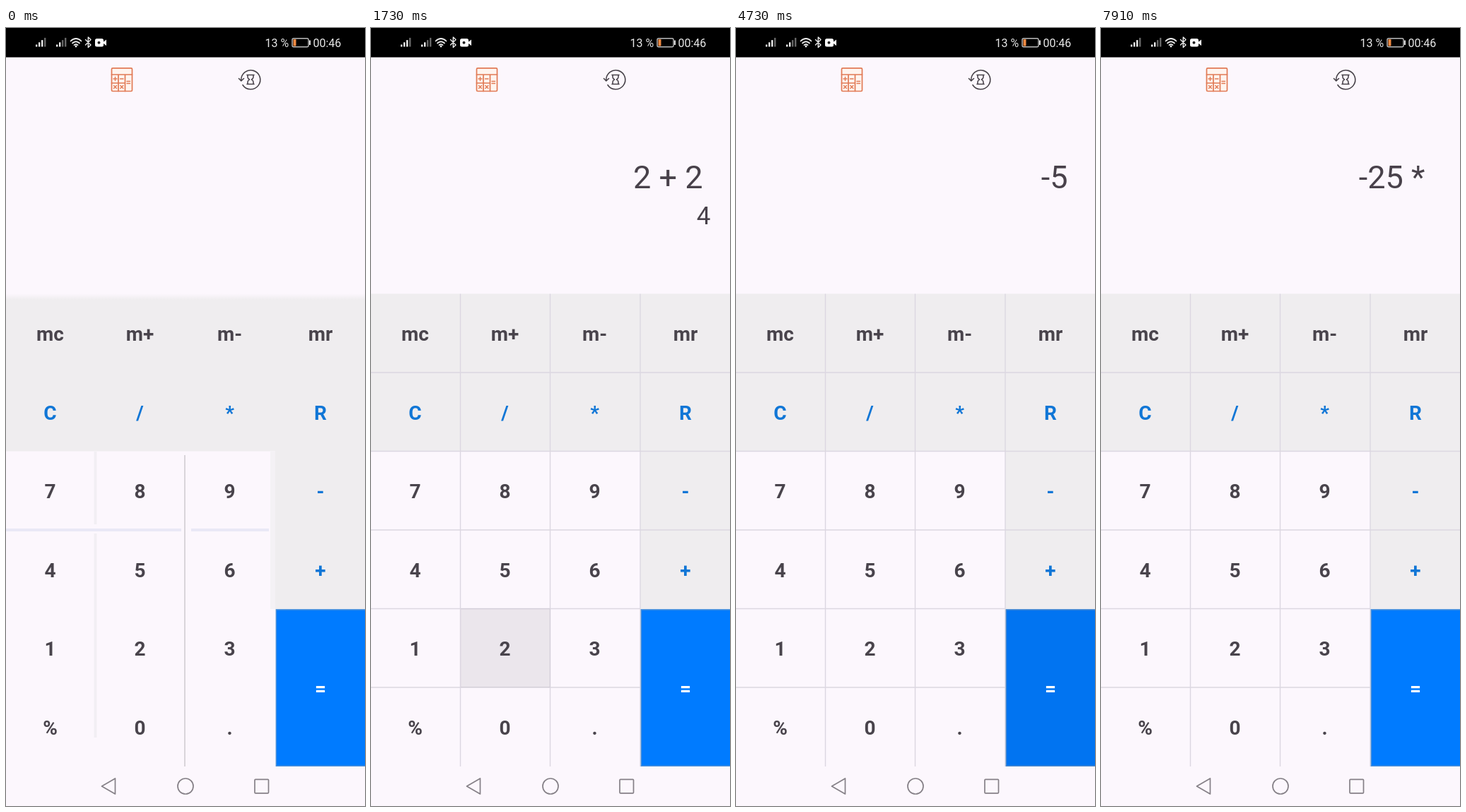
Animation, 508 px wide and 1102 px high, one loop 8000 ms. Source, as an HTML page:

```html
<!DOCTYPE html>
<html lang="en">
<head>
<meta charset="utf-8">
<title>Calculator</title>
<style>
  html, body { margin: 0; width: 100%; height: 100%; overflow: hidden; background: #fcf7fd; }
  svg { display: block; width: 100vw; height: 100vh; font-family: Roboto, sans-serif; }
  .key { font-size: 28px; font-weight: 700; text-anchor: middle; }
  .out { text-anchor: end; fill: #48414a; }
  .status { font-size: 16px; fill: #e8e8e8; }
  .line { fill: none; stroke-linecap: round; stroke-linejoin: round; }
</style>
</head>
<body>
<svg viewBox="0 0 508 1102" preserveAspectRatio="none">
  <defs>
    <clipPath id="keyClip"><rect id="clipBox"/></clipPath>
    <linearGradient id="softTop" x2="0" y2="1">
      <stop stop-color="#fcf7fd"/><stop offset="1" stop-color="#efedef"/>
    </linearGradient>
  </defs>
  <rect width="508" height="1102" fill="#fcf7fd"/>
  <rect width="508" height="41.5"/>

  <!-- status bar -->
  <g id="signals"></g>
  <g class="line" stroke="#eee" stroke-width="1.7">
    <path d="M91.5 18.5Q99 11.5 106.5 18.5M94 21.5Q99 17 104 21.5M96.5 24.2Q99 22 101.5 24.2"/>
    <path d="M112.5 16.5L120 24L116.3 27.5V13L120 16.5L112.5 24" stroke-width="1.4"/>
  </g>
  <circle cx="99" cy="26" r="1.4" fill="#eee"/>
  <rect x="126" y="15" width="12" height="11.5" rx="2.5" fill="#fff"/>
  <path d="M138 19.5L142 16.5V25L138 22Z" fill="#fff"/>
  <circle cx="131.5" cy="20.7" r="2" fill="#222"/>
  <text class="status" x="366.5" y="26.5">13 %</text>
  <rect x="405" y="14.7" width="23" height="12" rx="2" fill="none" stroke="#bbb" stroke-width="1.4"/>
  <rect x="406.5" y="16" width="4" height="9.5" fill="#f28a42"/>
  <rect x="429" y="17.5" width="2" height="6.5" fill="#ddd"/>
  <text class="status" x="434.5" y="26.5">00:46</text>

  <!-- header icons -->
  <g class="line" stroke="#e17a55" stroke-width="1.7">
    <rect x="149.5" y="56.8" width="29" height="32.7" rx="1.5" fill="#fff4ee"/>
    <path d="M149.5 66H178.5M168.5 66V89.5M159 66V89.5M149.5 78H168.5"/>
    <path d="M152 72H157M154.5 69.5V74.5M161.5 72H166M152.5 81.5L156.5 85.5M156.5 81.5L152.5 85.5M161.8 81.5L165.8 85.5M165.8 81.5L161.8 85.5M171 75.5H175.5M171 78.5H175.5" stroke-width="1.4"/>
  </g>
  <g class="line" stroke="#48434a" stroke-width="1.6">
    <path d="M332.8 74A13.5 13.5 0 1 1 335 80.7M329.5 71.5L332.8 75L336.5 71.5"/>
    <path d="M341 66.5H351M341 79.5H351M342 66.5V69.5Q342 71.5 344.5 73Q342 74.5 342 76.5V79.5M350 66.5V69.5Q350 71.5 347.5 73Q350 74.5 350 76.5V79.5"/>
  </g>

  <text id="expression" class="out" x="469.5" y="227.3" font-size="45"/>
  <text id="result" class="out" x="480.5" y="278" font-size="35"/>

  <!-- keypad -->
  <path d="M0 376.5H508V823.5H381V599.5H0Z" fill="#efedef"/>
  <path id="gridLines" fill="none" stroke="#dcd7e1" stroke-width="1.4"/>
  <g id="softLines">
    <rect y="376" width="508" height="9" fill="url(#softTop)"/>
    <path d="M0 711H248M262 711H372" stroke="#e9e8f6" stroke-width="4"/>
    <path d="M126.5 600V703M126.5 716V1005" stroke="#f2eff4" stroke-width="4"/>
    <path d="M253 605V1046" stroke="#c2bec4" stroke-width="1.2"/>
    <path d="M377.5 600V823" stroke="#f4f1f5" stroke-width="7"/>
  </g>
  <rect x="382" y="823.5" width="126" height="222" fill="#007bff"/>
  <path d="M508 824H382.3V1045.3H508" fill="none" stroke="#4a90d9" stroke-width="1.4"/>
  <circle id="ripple" clip-path="url(#keyClip)" fill="#140a18"/>
  <g id="labels"></g>

  <!-- navigation -->
  <g class="line" stroke="#858087" stroke-width="1.7">
    <path d="M135.5 1074L154.5 1063V1085Z"/>
    <circle cx="254" cy="1074" r="11"/>
    <rect x="352" y="1064.3" width="19.5" height="19.5" rx="1"/>
  </g>
</svg>
<script>
const LOOP = 8000;
const ROW_TOP = 376.5, ROW_HEIGHT = 111.5;
const COLUMN_EDGES = [0, 126.5, 253.5, 381, 508];
const LABEL_X = [62.5, 189.5, 316.5, 445];
const ROWS = [
  ["mc", "m+", "m-", "mr"],
  ["C", "/", "*", "R"],
  ["7", "8", "9", "-"],
  ["4", "5", "6", "+"],
  ["1", "2", "3", "="],
  ["%", "0", "."]
];
// press time, key, expression and result shown afterwards
const PRESSES = [
  [330, "2", "2", ""],
  [690, "+", "2 + ", ""],
  [1280, "2", "2 + 2", "4"],
  [2150, "=", "4", ""],
  [2710, "-", "4 - ", ""],
  [3350, "9", "4 - 9", "-5"],
  [4250, "=", "-5", ""],
  [4750, "*", "-5 * ", ""],
  [5240, "5", "-5 * 5", "-25"],
  [6750, "=", "-25", ""],
  [7280, "*", "-25 * ", ""]
];
const byId = id => document.getElementById(id);
const clamp = v => Math.max(0, Math.min(1, v));
const setAttrs = (node, attrs) => {
  for (const name in attrs) node.setAttribute(name, attrs[name]);
  return node;
};
function add(parent, tag, attrs) {
  const node = document.createElementNS("http://www.w3.org/2000/svg", tag);
  return parent.appendChild(setAttrs(node, attrs));
}

for (const [left, full] of [[42, 3], [71, 2]]) {
  for (let i = 0; i < 4; i++) {
    const height = 3 + i * 3.2;
    add(byId("signals"), "rect", {
      x: left + i * 4, y: 26.5 - height, width: 2.4, height,
      fill: i < full ? "#eee" : "#666"
    });
  }
}

const keys = {};
ROWS.forEach((row, r) => row.forEach((label, c) => {
  const tall = label === "=";
  const top = ROW_TOP + r * ROW_HEIGHT + (c === 3 ? 0.7 : 0);
  const height = ROW_HEIGHT * (tall ? 2 : 1);
  const x = COLUMN_EDGES[c] + 0.5;
  keys[label] = { x, y: top, width: COLUMN_EDGES[c + 1] - x, height };
  const fill = tall ? "#fff" : r === 1 || (c === 3 && r) ? "#1076d6" : "#49444c";
  add(byId("labels"), "text", {
    class: "key", x: LABEL_X[c], y: ROW_TOP + r * ROW_HEIGHT + height / 2 + 11, fill
  }).textContent = label;
}));

let grid = COLUMN_EDGES.slice(1, 4).map(x => `M${x} ${ROW_TOP}V1046`).join("");
for (let r = 1; r < 6; r++) {
  grid += `M0 ${ROW_TOP + r * ROW_HEIGHT}H${r < 4 ? 508 : 381}`;
}
byId("gridLines").setAttribute("d", grid);

function drawRipple(t) {
  const press = PRESSES.filter(([start]) => start <= t).pop();
  const age = press ? t - press[0] : LOOP;
  const opacity = 0.145 * (1 - clamp((age - 290) / 320));
  const ripple = byId("ripple");
  ripple.setAttribute("opacity", opacity);
  if (!opacity) return;
  const box = keys[press[1]];
  const spread = 1 - (1 - clamp(age / 265)) ** 2;
  setAttrs(byId("clipBox"), box);
  setAttrs(ripple, {
    cx: box.x + box.width / 2, cy: box.y + box.height / 2,
    r: Math.hypot(box.width, box.height) / 2 * spread
  });
}

function draw(t) {
  const shown = PRESSES.filter(([start]) => start + 130 <= t).pop();
  byId("expression").textContent = shown ? shown[2].replace(/ /g, "\u00a0") : "";
  byId("result").textContent = shown ? shown[3] : "";
  const sharp = clamp((t - 90) / 400);
  byId("gridLines").setAttribute("opacity", sharp);
  byId("softLines").setAttribute("opacity", 1 - sharp);
  drawRipple(t);
}

const began = performance.now();
function tick() {
  draw((performance.now() - began) % LOOP);
  requestAnimationFrame(tick);
}
tick();
</script>
</body>
</html>
```
